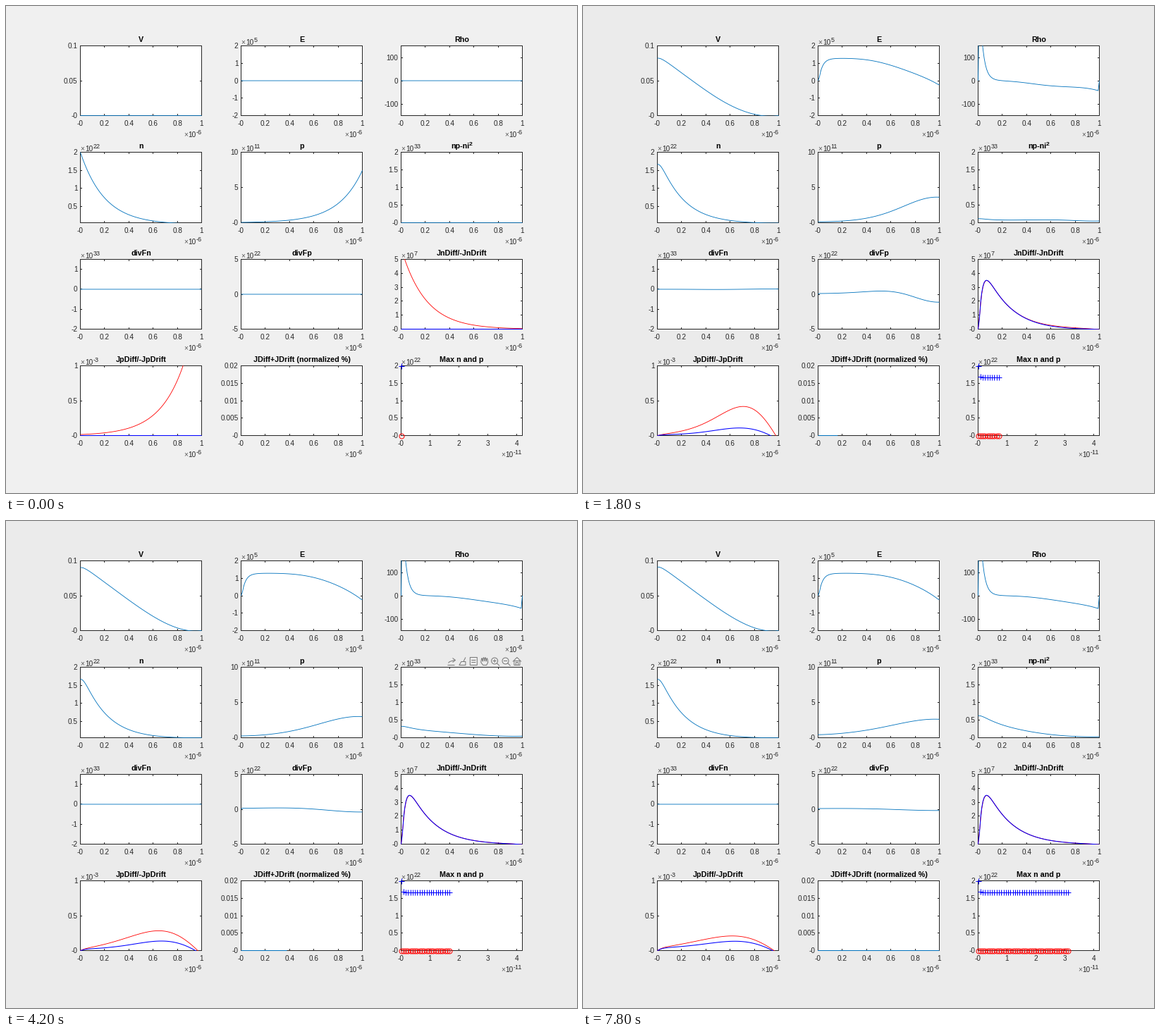
A matplotlib script for the animation above (8000 ms loop, 810 by 691 pixels).

```python
import numpy as np
import matplotlib.pyplot as plt
from matplotlib.animation import FuncAnimation
from matplotlib.patches import Rectangle

W, H = 810, 691
PX = 0.72                       # points per pixel at 100 dpi
FRAMES, STEP = 40, 200
INK, LINE, RED, BLUE, GREY = "#262626", "#0072BD", "#ff0000", "#0000ff", "#787878"

# --- carrier transport in a graded, doped bar (SI units) ---
Q, EPS, NI = 1.602e-19, 11.7 * 8.854e-12, 1e16
MU_N, MU_P, D = 0.14, 0.045, 0.14 * 0.02585
LENGTH, CELLS = 1e-6, 100
DX, DT, SUB = LENGTH / CELLS, 8e-15, 100
X = np.linspace(0, 1, CELLS + 1)
N0 = 2e22 * np.exp(-5 * X)
P0 = NI**2 / N0
VOL = np.full(CELLS + 1, DX)
VOL[[0, -1]] /= 2


def mid(a):
    return (a[1:] + a[:-1]) / 2


def cumulate(a):
    return np.concatenate(([0], np.cumsum(mid(a)) * DX))


def charge(n, p):
    rho = Q * ((p - P0) - (n - N0))
    rho[[0, -1]] = 0
    return rho


def rates(n, p):
    e = mid(cumulate(charge(n, p))) / EPS
    flow_n = D * np.diff(n) / DX + MU_N * mid(n) * e
    flow_p = D * np.diff(p) / DX - MU_P * mid(p) * e
    return [np.diff(np.concatenate(([0], f, [0]))) / VOL for f in (flow_n, flow_p)]


def snapshot(n, p, started):
    rho = charge(n, p)
    e = cumulate(rho) / EPS
    v = -cumulate(e)
    dn, dp = rates(n, p) if started else (0 * n, 0 * p)
    diff_n = -Q * D * np.gradient(n, DX)
    diff_p = Q * D * np.gradient(p, DX)
    if started:
        dp[0] = diff_n[0] = diff_p[0] = 0
    return [v - v[-1], e / 1e5, rho, n / 1e22, p / 1e11, (n * p - NI**2) / 1e33,
            dn / 1e33, dp / 1e22,
            diff_n / 1e7, Q * MU_N * n * e / 1e7,
            diff_p / 1e-3, Q * MU_P * p * e / 1e-3]


def simulate():
    n, p = N0.copy(), P0.copy()
    out = [snapshot(n, p, False)]
    for _ in range(FRAMES - 1):
        for _ in range(SUB):
            dn, dp = rates(n, p)
            n, p = n + DT * dn, p + DT * dp
        out.append(snapshot(n, p, True))
    return out


STATES = simulate()

# --- stage ---
plt.rcParams["font.family"] = "Liberation Sans"
fig = plt.figure(figsize=(W / 100, H / 100), dpi=100)
ax = fig.add_axes([0, 0, 1, 1])
ax.set_xlim(0, W)
ax.set_ylim(H, 0)
ax.axis("off")


def pen(xs, ys, color=INK, width=1.0, z=3):
    return ax.plot(xs, ys, color=color, lw=width * PX, zorder=z, snap=False,
                   solid_capstyle="butt")[0]


def label(x, y, s, size=10, ha="center", color=INK, **kw):
    return ax.text(x, y, s, fontsize=size * PX, ha=ha, va="baseline",
                   color=color, **kw)


def power_width(sup):
    return 18 + sum(3 if c == "-" else 5 for c in sup)


def power_label(x, y, sup):
    label(x, y, "×", ha="left", color="#5c5c5c")
    label(x + 6.5, y, "10", ha="left")
    label(x + 18, y - 3.5, sup, 9, "left")


def ticks_between(lo, hi, step):
    return step * np.arange(np.ceil(lo / step - 1e-9), np.floor(hi / step + 1e-9) + 1)


class Panel:
    def __init__(self, i, title, lo, hi, step, power="", xmax=1, xstep=0.2, xpower="-6"):
        row, col = divmod(i, 3)
        l, r = (round(x + 227.45 * col) + 0.5 for x in (105.3, 277.2))
        t, b = (int(y + 151.35 * row) + 0.5 for y in (56.5, 155.75))
        self.l, self.r, self.t, self.b = l, r, t, b
        self.lo, self.hi, self.xmax = lo, hi, xmax
        ax.add_patch(Rectangle((l, t), r - l, b - t, fc="white", ec=INK,
                               lw=PX, zorder=1, snap=False))
        for v in ticks_between(0, xmax, xstep):
            x = np.floor(self.px(v)) + 0.5
            pen([x, x], [b, b - 2.5], z=2)
            pen([x, x], [t, t + 2.5], z=2)
            label(x, b + 14, f"{v:g}")
        for v in ticks_between(lo, hi, step):
            y = np.floor(self.py(v)) + 0.5
            pen([l, l + 2.5], [y, y], z=2)
            pen([r, r - 2.5], [y, y], z=2)
            label(l - 4, y + 3.6, f"{v:g}", ha="right")
        if power:
            power_label(l, t - 2, power)
        power_label(r + 0.5 - power_width(xpower), b + 30, xpower)

        base, _, up = title.partition("^")
        cx = (l + r) / 2
        bold = dict(color="black", weight="bold")
        self.titles = [label(cx - 2.5 * bool(up), t - 5.6, base, 10.8, **bold),
                       label(cx + 10.3, t - 9.6, up, 8.5, "left", **bold)]

    def px(self, v):
        return self.l + np.asarray(v) / self.xmax * (self.r - self.l)

    def py(self, v):
        return self.b - (np.asarray(v) - self.lo) / (self.hi - self.lo) * (self.b - self.t)

    def curve(self, color=LINE, width=0.85):
        line = pen([], [], color, width)
        line.set_clip_path(Rectangle((self.l - 0.5, self.t - 0.5),
                                     self.r - self.l + 1, self.b - self.t + 1,
                                     transform=ax.transData))
        return line


# title, low, high, tick step, power of ten
SPECS = [
    ("V", 0, 0.1, 0.05),
    ("E", -2, 2, 1, "5"),
    ("Rho", -150, 150, 100),
    ("n", 0.05, 2, 0.5, "22"),
    ("p", 0, 10, 5, "11"),
    ("np-ni^2", 0, 2, 0.5, "33"),
    ("divFn", -2, 1.5, 1, "33"),
    ("divFp", -5, 5, 5, "22"),
    ("JnDiff/-JnDrift", 0, 5, 1, "7"),
    ("JpDiff/-JpDrift", 0, 1, 0.5, "-3"),
    ("JDiff+JDrift (normalized %)", 0, 0.02, 0.005),
    ("Max n and p", 0, 2, 0.5, "22", 4.2, 1, "-11"),
]
panels = [Panel(i, *spec) for i, spec in enumerate(SPECS)]

curves = [(p, p.curve()) for p in panels[:8]]
for p in panels[8:10]:
    curves += [(p, p.curve(RED)), (p, p.curve(BLUE, 1.05))]
residue = [panels[10].curve(width=1) for _ in range(2)]

peaks = panels[11]
plus, = ax.plot([], [], "+", color=BLUE, ms=8 * PX, mew=PX, zorder=4)
rings, = ax.plot([], [], "o", mfc="none", mec=RED, ms=7 * PX, mew=PX, zorder=4)


def toolbar(y=199.5, pitch=15.4):
    """Small grey tool icons above the np-ni panel."""
    parts = []
    cx = [632.5 + pitch * i for i in range(7)]

    def stroke(x, xs, ys):
        parts.append(pen(x + np.asarray(xs), y + np.asarray(ys), GREY))

    def box(x, w, top, bottom):
        stroke(x, [-w, w, w, -w, -w], [top, top, bottom, bottom, top])

    bend = np.linspace(0, 1, 8)
    stroke(cx[0], -5 + 9 * bend, 2 - 4 * np.sqrt(bend))             # export
    stroke(cx[0], [1, 5, 1], [-5, -2, 1])
    stroke(cx[0], [-6, 4], [5, 5])
    stroke(cx[1], [4, 1, -2, -5, 4, 4, 1], [-6, 0, 0, 5, 5, 0, 0])  # brush
    box(cx[2], 5, -6, 5)                                            # data tip
    for dy in (-2, 1):
        stroke(cx[2], [-3, 3], [dy, dy])
    fan = np.linspace(0, 1, 33)                                     # hand
    fingers = 1 - 5 * np.abs(np.sin(4 * np.pi * fan)) - 2 * np.sin(np.pi * fan)
    stroke(cx[3], np.r_[-5 + 10 * fan, 3, -2, -5], np.r_[fingers, 5, 5, 1])
    turn = np.linspace(0, 2 * np.pi, 24)
    for x in cx[4:6]:                                               # zoom
        stroke(x, -1 + 4.5 * np.cos(turn), -1 + 4.5 * np.sin(turn))
        stroke(x, [2, 6], [2, 6])
        stroke(x, [-3.5, 1.5], [-1, -1])
    stroke(cx[4], [-1, -1], [-3.5, 1.5])
    stroke(cx[6], [-6, 0, 6], [0, -6, 0])                           # home
    box(cx[6], 4, -1, 5)
    box(cx[6], 1.5, 1, 5)
    return parts


icons = toolbar()


def update(k):
    fig.set_facecolor("#f0f0f0" if k == 0 else "#ebebeb")
    for (panel, line), values in zip(curves, STATES[k]):
        line.set_data(panel.px(X), panel.py(values))

    # the balanced zone grows inward from both ends
    head = 0.018 * k
    tail = 1 - 0.004 * max(0, k - 21) ** 2
    for line, span in zip(residue, ((0, head), (tail, 1))):
        line.set_data(panels[10].px(span), panels[10].py((0, 0)))
        line.set_visible(span[1] > span[0])

    t = 0.08 * np.arange(k + 1)
    top_n = [s[3].max() for s in STATES[:k + 1]]
    plus.set_data(peaks.px(t), peaks.py(top_n))
    rings.set_data(peaks.px(t), peaks.py(0 * t))

    hover = 10 <= k < 36
    for a in icons:
        a.set_visible(hover)
    for a in panels[5].titles:
        a.set_visible(not hover)
    return []


anim = FuncAnimation(fig, update, frames=FRAMES, interval=STEP,
                     init_func=lambda: update(0), repeat=True, repeat_delay=0)
plt.show()
```
